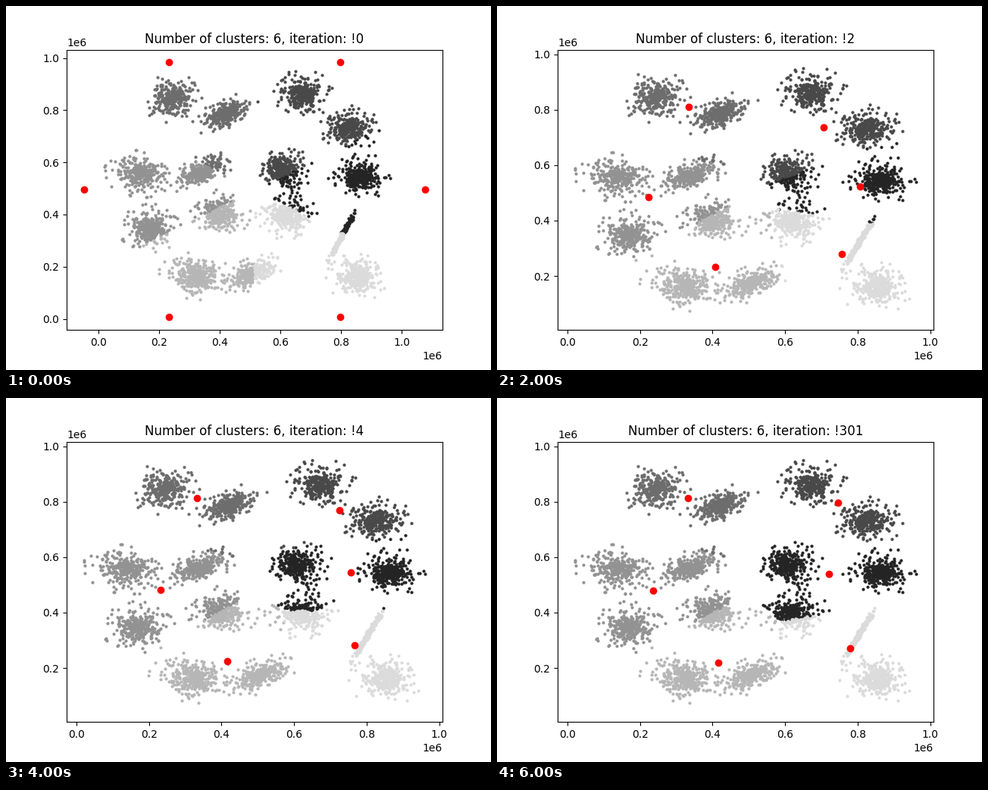
A matplotlib script that plays this animation: 640 by 480 pixels, repeating every 7000 ms.

```python
import numpy as np
import matplotlib.pyplot as plt
from matplotlib.animation import FuncAnimation

K = 6
MOVES = 5
PER_BLOB = 310
rng = np.random.default_rng(15)

# blob shapes: spread in x and y (thousands), correlation
ROUND = (34, 31, 0.0)
WIDE = (41, 30, -0.1)
LEANING = (36, 26, 0.55)
ROD = (18, 38, 0.985)

BLOBS = [
    (241, 847, ROUND), (416, 787, LEANING), (672, 862, ROUND),
    (823, 732, ROUND), (140, 557, WIDE), (337, 563, LEANING),
    (604, 574, ROUND), (860, 546, ROUND), (169, 348, ROUND),
    (399, 404, ROUND), (619, 398, ROUND), (322, 165, WIDE),
    (508, 176, LEANING), (851, 158, ROUND), (802, 318, ROD),
]

# data range and the middle of the starting ring
LOW = np.array([19.84e3, 51.12e3])
HIGH = np.array([961.95e3, 970.76e3])
MIDDLE = np.array([514.9e3, 494.7e3])
RADIUS = 563.7e3


def blob(cx, cy, shape):
    sx, sy, rho = shape
    z = rng.standard_normal((PER_BLOB, 2))
    z *= rng.uniform(0.5, 1.35, (PER_BLOB, 1))
    u, v = z.T * np.minimum(1, 3 / np.hypot(*z.T))
    x = cx + sx * u
    y = cy + sy * (rho * u + np.sqrt(1 - rho**2) * v)
    return 1e3 * np.column_stack([x, y])


def nearest(centres):
    gaps = np.linalg.norm(points[:, None] - centres, axis=2)
    return gaps.argmin(axis=1)


def moved(centres):
    owner = nearest(centres)
    return np.array([points[owner == k].mean(axis=0) for k in range(K)])


def fit_axes(low, high):
    pad = 0.05 * (high - low)
    (x0, y0), (x1, y1) = low - pad, high + pad
    ax.set(xlim=(x0, x1), ylim=(y0, y1))


points = np.clip(np.vstack([blob(*b) for b in BLOBS]), LOW, HIGH)

# centroids start evenly spaced on a ring, then follow their points
angle = 2 * np.pi * np.arange(K) / K
ring = MIDDLE + RADIUS * np.column_stack([np.cos(angle), np.sin(angle)])
steps = [ring]
for _ in range(MOVES):
    steps.append(moved(steps[-1]))

fig, ax = plt.subplots(figsize=(6.4, 4.8), dpi=100)
groups = [ax.plot([], [], "o", ms=2, color=str((k + 1) / (K + 1)))[0]
          for k in range(K)]
marks, = ax.plot([], [], "ro")


def update(i):
    centres = steps[min(i, MOVES)]
    owner = nearest(centres)
    for k, group in enumerate(groups):
        group.set_data(*points[owner == k].T)
    marks.set_data(*centres.T)
    if i == 0:
        fit_axes(ring.min(axis=0), ring.max(axis=0))
    else:
        fit_axes(LOW, HIGH)
    count = i if i <= MOVES else 301
    ax.set_title(f"Number of clusters: {K}, iteration: !{count}")
    return *groups, marks


anim = FuncAnimation(fig, update, frames=MOVES + 2, interval=1000,
                     repeat=True, repeat_delay=0, blit=False)
plt.show()
```
